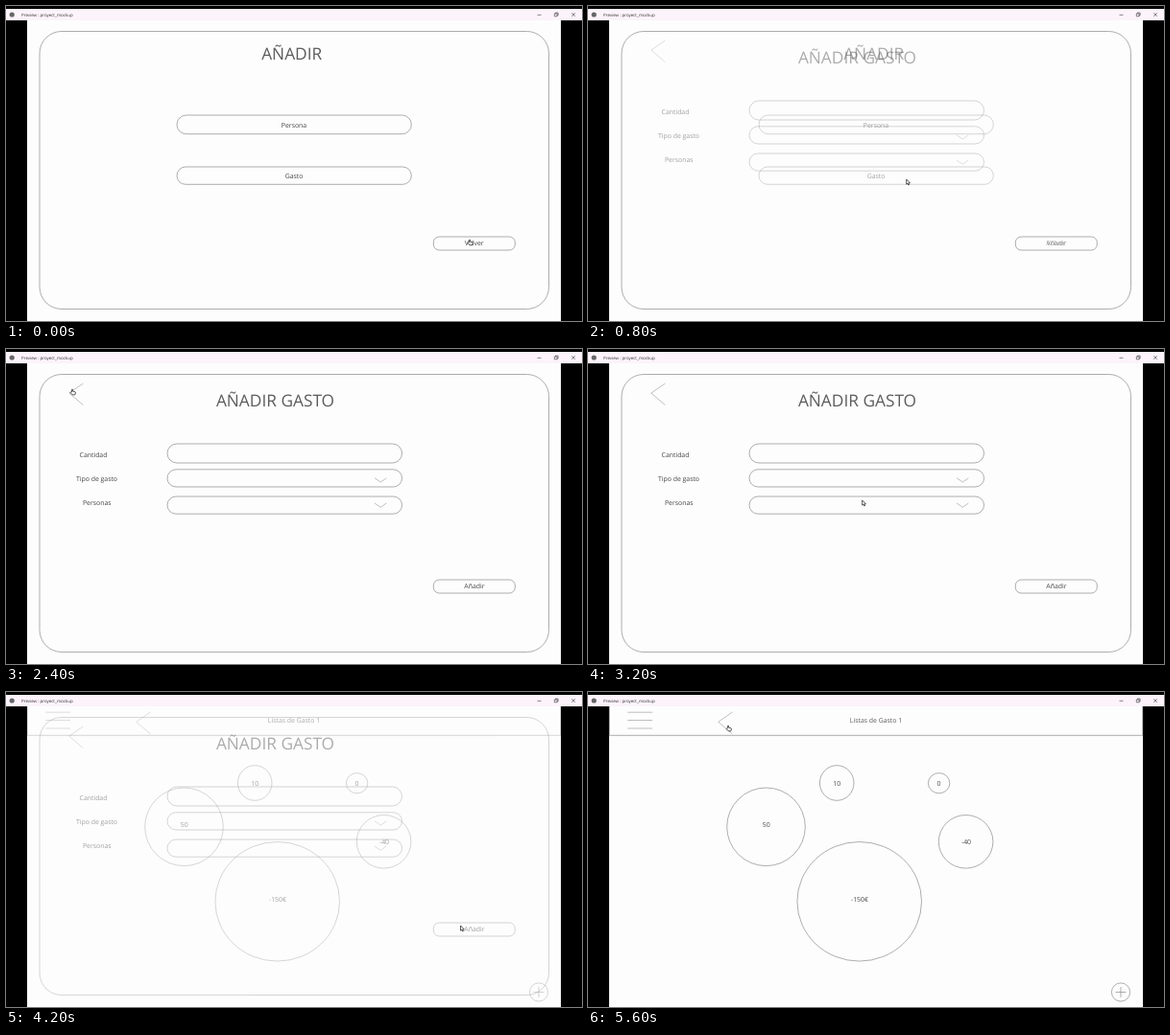
Animation, 600 px wide and 329 px high, one loop 8 s. Source, as an HTML page:

```html
<!DOCTYPE html>
<html lang="es">
<head>
<meta charset="utf-8">
<title>Preview</title>
<style>
  html, body { margin: 0; width: 100%; height: 100%; overflow: hidden; background: #000; }
  svg { display: block; width: 100vw; height: 100vh; }
  text { font: 6.9px "Open Sans", "Noto Sans", sans-serif; fill: #444; text-anchor: middle; text-rendering: geometricPrecision; }
  .title { font-size: 17.3px; fill: #5c5c5c; }
  .caption { font-size: 4.45px; fill: #333; text-anchor: start; }
  .head { fill: #5c5c5c; }
  .lines { fill: none; stroke: #8c8c8c; stroke-width: .7; }
  .thin { stroke: #a4a4a4; }
  .window { fill: none; stroke: #333; stroke-width: .6; }
  #cursor path { fill: #fff; stroke: #222; stroke-width: .75; stroke-linejoin: round; }
</style>
</head>
<body>
<svg viewBox="0 0 600 329">
  <rect width="600" height="329"/>
  <rect y="3" width="600" height="12" fill="#fcf4fa"/>
  <circle cx="6.2" cy="9" r="2.6" fill="#666"/>
  <text class="caption" x="16" y="10.8">Preview : proyect_mockup</text>
  <path class="window" d="M553.5 9.3h4M571.3 8h2.8v2.8h-2.8zM572.3 8v-1h2.8v2.8h-1M589.3 7.2l3.6 3.6m0-3.6l-3.6 3.6"/>
  <rect x="22" y="15" width="556" height="314" fill="#fdfdfe"/>

  <g id="frame" class="lines">
    <rect x="35" y="26.5" width="530.5" height="290" rx="23"/>
    <rect x="445.3" y="241" width="85" height="14" rx="6"/>
  </g>

  <g id="menu">
    <text class="title" x="297.7" y="55.8">AÑADIR</text>
    <g class="lines">
      <rect x="178" y="114" width="244.3" height="19.7" rx="9.8"/>
      <rect x="178" y="168" width="244.3" height="18.3" rx="9.1"/>
    </g>
    <text x="300" y="127.4">Persona</text>
    <text x="300" y="180.2">Gasto</text>
    <text x="487.7" y="250.2">Volver</text>
  </g>

  <g id="form">
    <text class="title" x="280.5" y="60.2">AÑADIR GASTO</text>
    <g class="lines">
      <rect x="168" y="99" width="244.5" height="20" rx="10"/>
      <rect x="168" y="125.8" width="244.5" height="18.2" rx="9.1"/>
      <rect x="168" y="154" width="244.5" height="18.2" rx="9.1"/>
      <path class="thin" d="M80.3 36L65.8 46L80.3 58.5M384 134.8l6.3 4.2 6-4.2M384 161l6.3 4.3 6-4.3"/>
    </g>
    <text x="91" y="112.7">Cantidad</text>
    <text x="94.5" y="138">Tipo de gasto</text>
    <text x="94.7" y="163.3">Personas</text>
    <text x="487.9" y="250.2">Añadir</text>
  </g>

  <g id="list">
    <g class="lines">
      <path d="M22.3 15V45.3H577.7V15"/>
      <path class="thin" d="M41.3 21.2H67M41.3 29.5H67M41.3 38H67M150.3 21L135.7 31.3L150.3 43.7"/>
      <circle cx="185.5" cy="140.8" r="40.8"/>
      <ellipse cx="259.2" cy="95" rx="17.8" ry="18.3"/>
      <ellipse cx="365.6" cy="95.2" rx="11.2" ry="10.6"/>
      <ellipse cx="393.6" cy="156.3" rx="28.3" ry="27.8"/>
      <ellipse cx="282.7" cy="218.8" rx="64.8" ry="62.3"/>
      <circle cx="555" cy="313.5" r="9.6"/>
      <path d="M549.5 313.5h11M555 308v11"/>
    </g>
    <text class="head" x="300" y="31.8">Listas de Gasto 1</text>
    <text x="185.7" y="141">50</text>
    <text x="259.3" y="98.2">10</text>
    <text x="365.6" y="98.2">0</text>
    <text x="394" y="159.3">-40</text>
    <text x="283" y="219.2">-150€</text>
  </g>

  <g id="cursor">
    <path id="arrow" d="M0 0V5.2L1.2 4.2L2 6L2.9 5.6L2.1 3.9H3.7Z"/>
    <path id="hand" d="M-.6 3V.4Q0-.5.6.4V2.2L3 2.8Q3.6 3 3.4 3.8L2.8 5.8H.2L-1.8 3.6Q-1.6 2.7-.6 3Z"/>
  </g>
</svg>
<script>
const LOOP = 8000, STEP = 200;
const el = id => document.getElementById(id);
const ease = p => { p = Math.min(1, Math.max(0, p)); return p * p * (3 - 2 * p); };

const FADE = 400, FORM_AT = 600, LIST_AT = 4000;

// Cursor moves: start, end, destination x, y
const start = [483, 244];
const moves = [
  [0, 600, 330, 180],
  [600, 800, 331.7, 181],
  [800, 1400, 463, 243],
  [1400, 2300, 69, 42],
  [2400, 3600, 361.5, 198.5],
  [3600, 3800, 477, 245],
  [4000, 4200, 473.5, 244],
  [4200, 5200, 151, 41],
  [5200, 5600, 146, 35]
];

// Clickable areas on each page: left, top, right, bottom
const button = [445, 241, 530, 255];
const hotspots = [
  [[178, 114, 422, 134], [178, 168, 422, 186], button],
  [[65, 36, 81, 59], button],
  [[135, 20, 151, 44]]
];

function cursorAt(t) {
  let [x, y] = start;
  for (const [from, to, toX, toY] of moves) {
    const p = ease((t - from) / (to - from));
    x += (toX - x) * p;
    y += (toY - y) * p;
  }
  return [x, y];
}

function draw(now) {
  const t = Math.floor(now % LOOP / STEP) * STEP;
  const form = ease((t - FORM_AT) / FADE);
  const list = ease((t - LIST_AT) / FADE);
  el("frame").style.opacity = 1 - list;
  el("menu").style.opacity = 1 - form;
  el("form").style.opacity = form * (1 - list);
  el("list").style.opacity = list;

  const [x, y] = cursorAt(t);
  const page = t > LIST_AT ? 2 : t > FORM_AT ? 1 : 0;
  const over = hotspots[page].some(([l, top, r, b]) => x >= l && x <= r && y >= top && y <= b);
  el("cursor").setAttribute("transform", `translate(${x} ${y})`);
  el("hand").style.display = over ? "" : "none";
  el("arrow").style.display = over ? "none" : "";
}

const began = performance.now();
function tick() {
  draw(performance.now() - began);
  requestAnimationFrame(tick);
}
tick();
</script>
</body>
</html>
```
